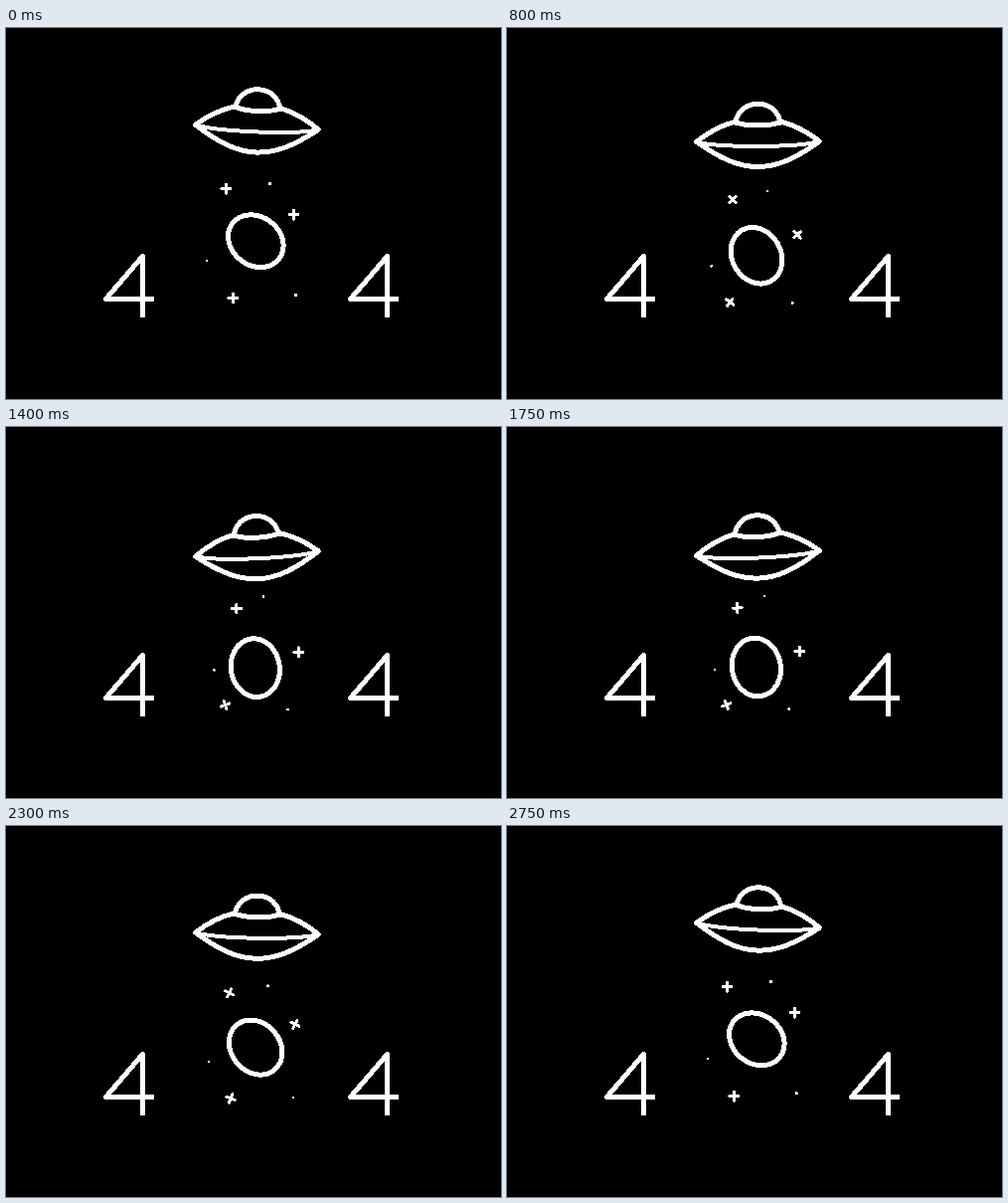
These frames come from a looping animation (498 px wide and 373 px high, 2800 ms). An HTML page:

```html
<!DOCTYPE html>
<html lang="en">
<head>
<meta charset="utf-8">
<title>404</title>
<style>
  html, body { margin: 0; width: 100%; height: 100%; overflow: hidden; background: #000; }
  svg { display: block; width: 498px; height: 373px; }
  .line { fill: none; stroke: #fff; stroke-width: 5; stroke-linecap: round; stroke-linejoin: round; }
</style>
</head>
<body>
<svg viewBox="0 0 498 373" shape-rendering="crispEdges" role="img" aria-label="404">
  <defs>
    <path id="four" d="M137.5 289V229.5L100.5 272.5H147"/>
    <path id="cross" d="M-4.5 0H4.5M0-4.5V4.5" stroke-width="3"/>
    <circle id="dot" r="1.4" fill="#fff" stroke="none"/>
  </defs>
  <g class="line">
    <use href="#four"/>
    <use href="#four" x="246"/>
    <g id="ufo">
      <path d="M-62 0Q-43-15-23-20C-14-15 14-15 23-20Q43-15 62 0C38 17 20 25.3 0 25.3S-38 17-62 0Z"/>
      <path d="M-22.5-19C-21-30-12-38 0-38S21-30 22.5-19"/>
      <path d="M-62 0C-40 6.3 40 6.3 62 0" stroke-width="4"/>
    </g>
    <ellipse id="planet" rx="29.5" ry="24.5"/>
    <g id="stars"></g>
  </g>
</svg>
<script>
const LOOP = 2800, HALF = LOOP / 2, STEP = 50, DELAY = 90;
const byId = id => document.getElementById(id);
const ufo = byId('ufo'), planet = byId('planet');

// shape, start x, start y, travel x, travel y, turn in degrees
const stars = [
  ['cross', 221.5, 161.5, 10.5, 21, 90],
  ['cross', 289.5, 187.5, 5, 39, 90],
  ['cross', 228.5, 271.5, -8, 8, 70],
  ['dot', 265.5, 156.5, -6.5, 14, 0],
  ['dot', 201.8, 233.8, 7.5, 10.5, 0],
  ['dot', 291.5, 268.5, -8, 15.5, 0]
].map(([shape, ...move]) => {
  const node = document.createElementNS('http://www.w3.org/2000/svg', 'use');
  node.setAttribute('href', '#' + shape);
  byId('stars').append(node);
  return { node, move };
});

const easeInOut = u => u < 0.5 ? 4 * u ** 3 : 1 - 4 * (1 - u) ** 3;

function place(node, x, y, angle) {
  node.setAttribute('transform', `translate(${x} ${y}) rotate(${angle})`);
}

function draw(now) {
  const time = Math.floor(now % LOOP / STEP) * STEP;
  const phase = (time - DELAY + LOOP) % LOOP;
  const e = easeInOut(1 - Math.abs(phase - HALF) / HALF);

  place(ufo, 252.5, 99.7 + 27.8 * e, 2.3 - 4.8 * e);
  place(planet, 251.3 - 0.5 * e, 214.2 + 28 * e, 36.5 + 44 * e);
  for (const { node, move: [x, y, dx, dy, turn] } of stars)
    place(node, x + dx * e, y + dy * e, turn * e);
  requestAnimationFrame(draw);
}
draw(0);
</script>
</body>
</html>
```
